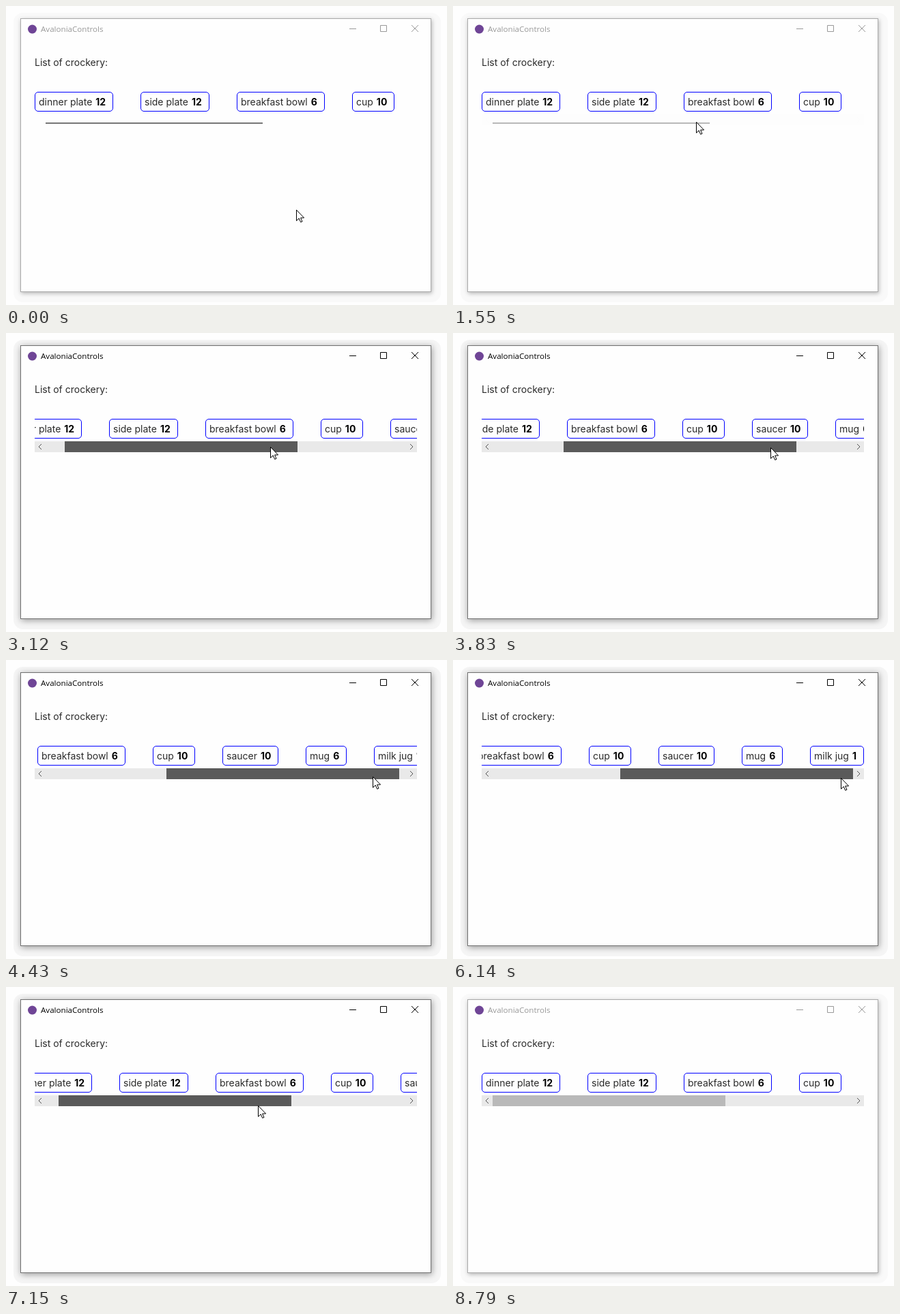
Animation of 646 by 439 pixels, one loop 8.81 s. Source, as an HTML page:

```html
<!DOCTYPE html>
<html lang="en">
<head>
<meta charset="utf-8">
<title>Crockery list</title>
<style>
  html, body { margin: 0; width: 100%; height: 100%; overflow: hidden; background: #fefefe; }
  body { font: 14px/17px Inter, sans-serif; color: #2a2a2a; }
  #halo, #window, #heading, #viewport, svg { position: absolute; }
  #halo { left: 11px; top: 10px; width: 626px; height: 425px; border-radius: 14px; background: #f9f9f9; }
  #window {
    left: 21px; top: 18px; width: 600px; height: 400px;
    background: #fefefe; border: 1px solid #aaa;
    box-shadow: 1px 2px 6px rgba(0, 0, 0, .28);
  }
  #heading { left: 42px; top: 74px; }
  #viewport { left: 42px; top: 126px; width: 560px; height: 30px; overflow: hidden; }
  #strip { display: flex; gap: 40px; width: max-content; }
  #strip div {
    flex: none; box-sizing: border-box; padding: 5px; white-space: nowrap;
    border: 1px solid #00f; border-radius: 5px;
  }
  #strip b { margin: 0 5px; color: #000; }
  svg { left: 0; top: 0; }
  #chrome { color: #999; }
  #chrome text { font: 11.6px "Open Sans", sans-serif; fill: currentColor; }
  #chrome path { fill: none; stroke: currentColor; }
  .active #halo { background: #f5f5f5; }
  .active #window { border-color: #707070; box-shadow: 1px 2px 9px rgba(0, 0, 0, .38); }
  .active #chrome { color: #000; }
</style>
</head>
<body>
<div id="halo"></div>
<div id="window"></div>
<div id="heading">List of crockery:</div>
<div id="viewport"><div id="strip"></div></div>
<svg width="646" height="439" viewBox="0 0 646 439">
  <circle cx="38.5" cy="34" r="6.5" fill="#6f4596"/>
  <g id="chrome">
    <text x="51" y="38">AvaloniaControls</text>
    <path d="M503 33.5h10M548.5 28.5h9v9h-9zM594 28l10 10M604 28l-10 10"/>
  </g>
  <g id="track">
    <rect x="42" y="159" width="560" height="16" fill="#e9e9e9"/>
    <path d="M52 163l-4 4 4 4M592 163l4 4-4 4" fill="none" stroke="#555"/>
  </g>
  <rect id="thumb"/>
  <path id="cursor" d="M.5.5V16.3L4.2 12.8 6.7 18.4 9 17.4 6.6 12H11.6Z" fill="#fff" stroke="#000"/>
</svg>
<script>
const LOOP = 8810;
const ACTIVATE = 2470, RELEASE = 7810, CURSOR_GONE = 8280, DEACTIVATE = 8790;
const HOVER = 1190, EXPAND = 1550, EXPAND_TIME = 180;

const $ = id => document.getElementById(id);
const clamp = (v, low, high) => Math.max(low, Math.min(high, v));
const mix = (a, b, p) => a + (b - a) * p;

const crockery = {
  'dinner plate': 12, 'side plate': 12, 'breakfast bowl': 6,
  'cup': 10, 'saucer': 10, 'mug': 6, 'milk jug': 1
};
$('strip').innerHTML = Object.entries(crockery)
  .map(([label, count]) => `<div>${label}<b>${count}</b></div>`).join('');
// Whole-pixel widths keep every border crisp
for (const item of $('strip').children) {
  item.style.width = Math.round(item.getBoundingClientRect().width) + 'px';
}

// Scroll bar geometry follows from the content width
const VIEW = 560, TRACK_LEFT = 58, TRACK = 528;
const content = $('strip').offsetWidth;
const thumbWidth = Math.round(TRACK * VIEW / content);
const travel = TRACK - thumbWidth;

// Cursor stops: time, x, y
const stops = [
  [440, 425, 299], [1250, 356, 170],
  [2100, 356, 170], [2220, 356, 168],
  [2640, 356, 168], [3120, 386.45, 167], [3830, 464.6, 168], [4700, 570, 172],
  [6130, 570, 173], [7150, 369, 174], [7570, 334, 174],
  [7750, 334, 174], [8220, 552, 417]
];
function cursorAt(t) {
  const i = clamp(stops.findLastIndex(stop => stop[0] <= t), 0, stops.length - 2);
  const [t0, x0, y0] = stops[i], [t1, x1, y1] = stops[i + 1];
  const p = clamp((t - t0) / (t1 - t0), 0, 1);
  return [mix(x0, x1, p), mix(y0, y1, p)];
}

// While dragged, the thumb trails the cursor slightly
const GRAB = 298.8, LAG = 33;
function thumbOffset(t) {
  if (t < ACTIVATE || t >= RELEASE) return 0;
  return clamp(Math.round(cursorAt(t - LAG)[0] - GRAB) - TRACK_LEFT, 0, travel);
}

function thumbColor(t) {
  if (t >= ACTIVATE && t < RELEASE) return '#5a5a5a';
  if (t > EXPAND) return '#b9b9b9';
  return t >= HOVER ? '#959595' : '#767676';
}

function draw() {
  const t = performance.now() % LOOP;
  document.body.className = t >= ACTIVATE && t < DEACTIVATE ? 'active' : '';

  const [x, y] = cursorAt(t).map(Math.round);
  $('cursor').setAttribute('transform', `translate(${x} ${y})`);
  $('cursor').style.display = t < CURSOR_GONE ? '' : 'none';

  const offset = thumbOffset(t);
  const scroll = Math.round(offset * (content - VIEW) / travel);
  $('strip').style.transform = `translateX(${-scroll}px)`;

  const expand = clamp((t - EXPAND) / EXPAND_TIME, 0, 1);
  const top = mix(171, 159, expand);
  $('track').style.opacity = expand;
  const box = {
    x: TRACK_LEFT + offset, y: top,
    width: mix(318, thumbWidth, expand), height: mix(173, 175, expand) - top,
    fill: thumbColor(t)
  };
  for (const name in box) $('thumb').setAttribute(name, box[name]);

  requestAnimationFrame(draw);
}
draw();
</script>
</body>
</html>
```
